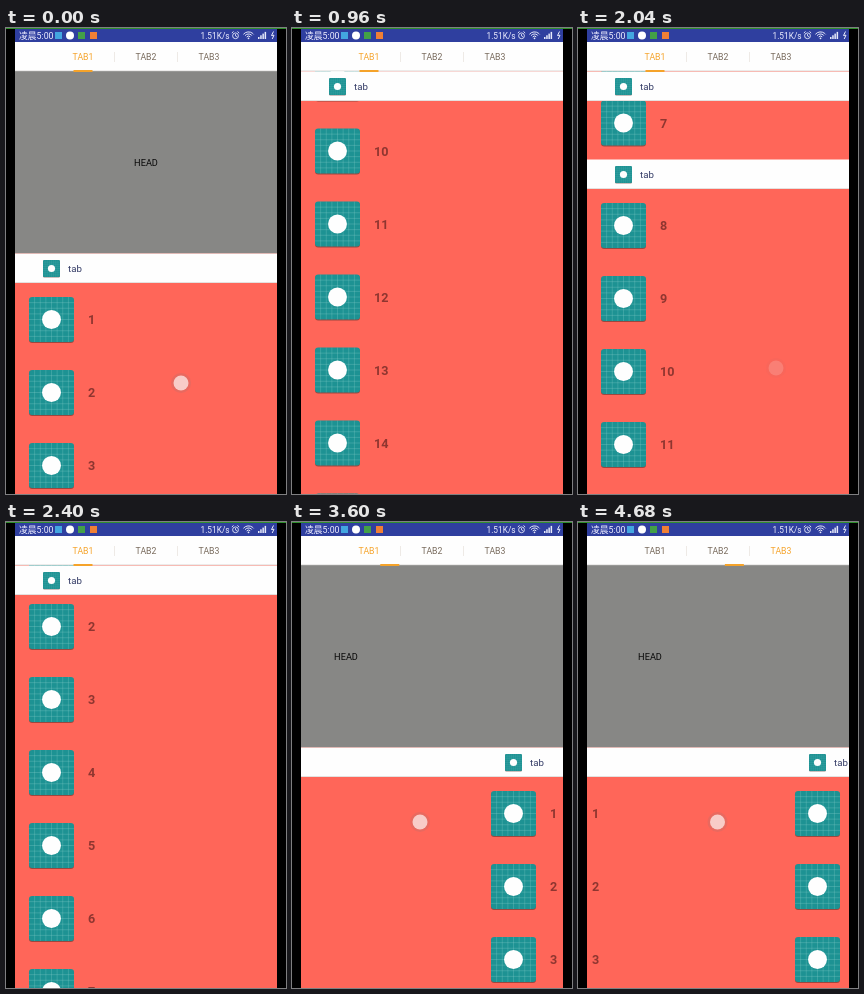
An HTML page with a canvas for the animation above (4.8 s loop, 280 by 466 pixels).

```html
<!DOCTYPE html>
<html lang="en">
<head>
<meta charset="utf-8">
<title>Sticky tab list</title>
<style>
html, body { margin: 0; width: 100%; height: 100%; overflow: hidden; background: #000; }
canvas { display: block; width: 280px; height: 466px; }
</style>
</head>
<body>
<canvas id="stage" width="280" height="466"></canvas>
<script>
const ctx = document.getElementById('stage').getContext('2d');
const LOOP = 4800, STEP = 120;
const LEFT = 9, WIDTH = 262, TOP = 43, ROW = 73, HEADER = 29.5;
const ORANGE = '#f5a32a', WHITE = '#fefefe', TEAL = '#1d9293';

// Keyframes: [time, value, ...]
const SCROLL = [[0, 0], [120, 40], [240, 130], [360, 275], [600, 545], [960, 855],
  [1200, 1040], [1440, 1222], [1560, 1209.5], [1680, 1106], [1800, 950], [2040, 634.5],
  [2280, 360], [2520, 160], [2760, 40], [2880, 0]];
const PAGE = [[3360, 0], [3480, .1], [3600, .33], [3720, .7], [3840, .93], [3960, .989],
  [4080, 1], [4440, 1], [4560, 1.1], [4680, 1.26]];
// Touches: [time, x, y, alpha]
const TOUCHES = [
  [[0, 175, 355, 1], [120, 175, 312, 1], [240, 178, 222, 1], [360, 180, 200, .3]],
  [[1440, 186, 222, 1], [1560, 187, 236, 1], [1680, 198, 340, 1], [1920, 198, 340, .6], [2040, 198, 340, .25]],
  [[3360, 222, 300, 1], [3480, 190, 300, 1], [3600, 128, 300, 1], [3720, 110, 300, .4]],
  [[4440, 215, 300, 1], [4560, 182, 300, 1], [4680, 139.5, 300, 1]]
];

function at(keys, t, col = 1) {
  if (t <= keys[0][0]) return keys[0][col];
  for (let i = 1; i < keys.length; i++) {
    const a = keys[i - 1], b = keys[i];
    if (t <= b[0]) return a[col] + (b[col] - a[col]) * (t - a[0]) / (b[0] - a[0]);
  }
  return keys[keys.length - 1][col];
}

function rect(x, y, w, h, color) {
  ctx.fillStyle = color;
  ctx.fillRect(x, y, w, h);
}

function circle(x, y, r, color) {
  ctx.fillStyle = color;
  ctx.beginPath();
  ctx.arc(x, y, r, 0, Math.PI * 2);
  ctx.fill();
}

function text(str, x, y, size, color, align = 'left', weight = 400) {
  ctx.font = `${weight} ${size}px Roboto, "Noto Sans CJK SC", "Noto Sans CJK", sans-serif`;
  ctx.textAlign = align;
  ctx.textBaseline = 'alphabetic';
  ctx.fillStyle = color;
  ctx.fillText(str, x, y);
}

function line(points, color, width = 1) {
  ctx.strokeStyle = color;
  ctx.lineWidth = width;
  ctx.beginPath();
  points.forEach(([x, y]) => ctx.lineTo(x, y));
  ctx.stroke();
}

// Gridded tile with a plain dot
function tile(x, y, size) {
  const box = (dy, color) => {
    ctx.fillStyle = color;
    ctx.beginPath();
    ctx.roundRect(x, y + dy, size, size, size / 14);
    ctx.fill();
  };
  box(size / 45, 'rgba(90,50,45,.6)');
  box(0, TEAL);
  for (let i = 1; i < 8; i++) {
    const d = size * i / 8;
    line([[x + d, y], [x + d, y + size]], 'rgba(140,210,205,.38)', size / 60);
    line([[x, y + d], [x + size, y + d]], 'rgba(140,210,205,.38)', size / 60);
  }
  circle(x + size / 2, y + size / 2, size * .21, WHITE);
}

function header(x, y) {
  rect(x, y, WIDTH, HEADER, WHITE);
  rect(x, y + HEADER - .8, WIDTH, .8, '#dedad8');
  tile(x + 28, y + 6.5, 17);
  text('tab', x + 53, y + 18.5, 9.7, '#343c66');
}

function page(x, scroll) {
  const headY = TOP - scroll;
  rect(x, headY, WIDTH, 182.5, '#878785');
  text('HEAD', x + 131, headY + 95, 9.2, '#080808', 'center');

  const headers = [];
  let y = 225.5 - scroll;
  for (let n = 1; n <= 26; n++) {
    if (n === 1 || n % 8 === 0) {
      headers.push(y);
      y += HEADER;
    }
    if (y > -ROW && y < 466) {
      tile(x + 14, y + 14, 45);
      text(n, x + 73, y + 41, 12.6, '#8f3630', 'left', 700);
    }
    y += ROW;
  }
  headers.forEach(h => { if (h < 466) header(x, Math.max(TOP + .5, h)); });
}

function statusBar() {
  rect(LEFT, 0, WIDTH, 14, '#2f3f9f');
  rect(0, 0, 280, 1, '#2f8f2c');
  text('凌晨5:00', 13, 10.8, 8.8, '#eef');
  rect(49, 4, 7, 7, '#43a6e0');
  circle(64, 7.5, 4, '#fff');
  rect(72, 4, 7, 7, '#43a047');
  rect(84, 4, 7, 7, '#f07f35');
  text('1.51K/s', 194.5, 10.6, 8.3, '#eef');

  const ink = '#e6e9fa';
  ctx.strokeStyle = ink;
  ctx.lineWidth = .9;
  ctx.beginPath();
  ctx.arc(229.5, 7.8, 2.9, 0, Math.PI * 2);
  ctx.stroke();
  line([[229.5, 6], [229.5, 8], [231, 8.6]], ink, .8);
  line([[225.8, 5], [227.5, 3.5]], ink);
  line([[231.5, 3.5], [233.2, 5]], ink);
  [2.4, 4.5, 6.6].forEach(r => {
    ctx.lineWidth = 1;
    ctx.beginPath();
    ctx.arc(242.5, 10.5, r, -Math.PI * .78, -Math.PI * .22);
    ctx.stroke();
  });
  circle(242.5, 10.3, .9, ink);
  for (let i = 0; i < 4; i++) rect(252 + i * 2.2, 9 - i * 1.7, 1.5, 2 + i * 1.7, ink);
  line([[267.5, 3.5], [265.5, 7.5], [268, 7.2], [266.2, 11]], ink);
}

function tabBar(pos, selected) {
  rect(LEFT, 14, WIDTH, TOP - 14, WHITE);
  rect(LEFT, TOP - .5, WIDTH, .7, '#dcdad8');
  for (let i = 0; i < 3; i++) {
    const x = 77 + i * 63;
    text('TAB' + (i + 1), x, 32.4, 8.7, i === selected ? ORANGE : '#77695b', 'center');
    if (i) rect(x - 32, 24, 1, 10, '#eeeae6');
  }
  rect(67.5 + pos * 63, 42, 19, 2, ORANGE);
}

function touch(t) {
  for (const keys of TOUCHES) {
    if (t < keys[0][0] || t > keys[keys.length - 1][0]) continue;
    const [x, y, alpha] = [1, 2, 3].map(c => at(keys, t, c));
    ctx.globalAlpha = alpha;
    circle(x, y, 10, 'rgba(200,110,105,.4)');
    circle(x, y, 7.5, 'rgba(250,222,218,.85)');
    ctx.globalAlpha = 1;
  }
}

function draw(now) {
  const t = Math.floor(now % LOOP / STEP) * STEP;
  const pos = at(PAGE, t);
  const selected = t >= 4680 ? 2 : t >= 3720 ? 1 : 0;

  rect(0, 0, 280, 466, '#000');
  ctx.save();
  ctx.beginPath();
  ctx.rect(LEFT, TOP, WIDTH, 466 - TOP);
  ctx.clip();
  rect(LEFT, TOP, WIDTH, 466 - TOP, '#ff6659');
  for (let i = 0; i < 3; i++) {
    if (Math.abs(i - pos) < 1) page(LEFT + Math.round((i - pos) * WIDTH), at(SCROLL, t));
  }
  ctx.restore();
  tabBar(pos, selected);
  statusBar();
  touch(t);
}

const start = performance.now();
function tick() {
  draw(performance.now() - start);
  requestAnimationFrame(tick);
}
tick();
</script>
</body>
</html>
```
